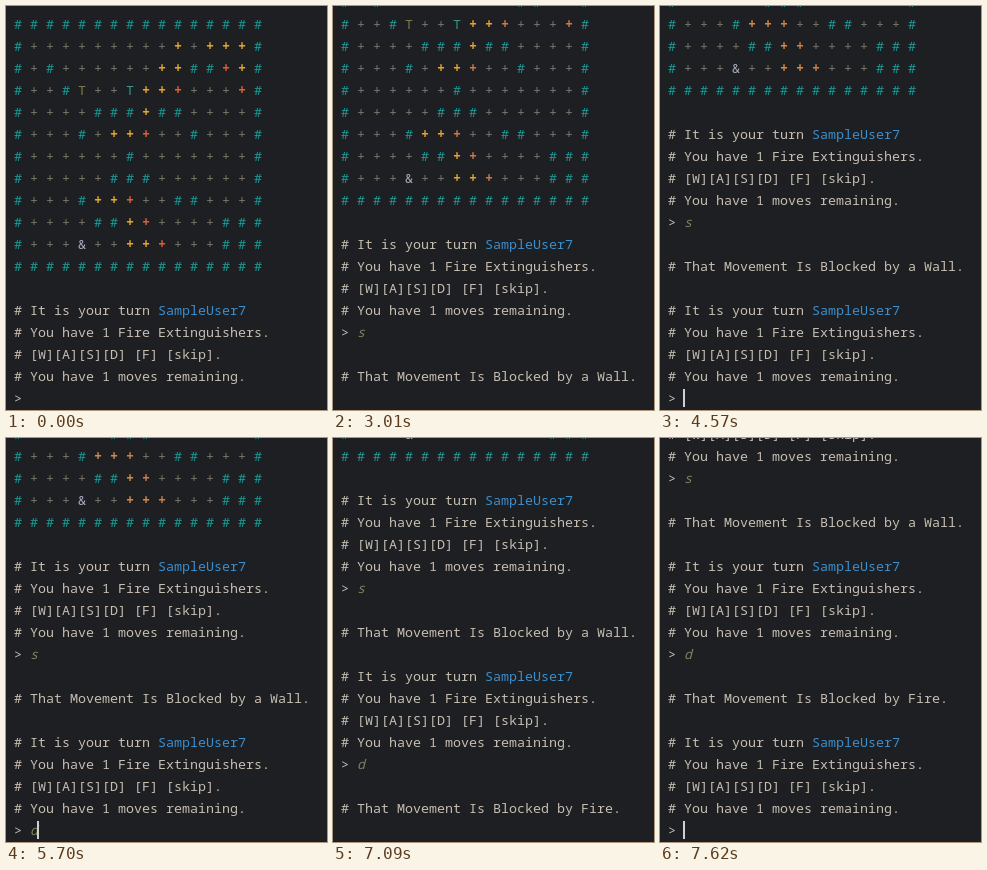
An HTML page with a canvas that plays this animation: 321 by 404 pixels, repeating every 8 s.

```html
<!DOCTYPE html>
<html lang="en">
<head>
<meta charset="utf-8">
<title>Terminal game</title>
<style>
  html, body { margin: 0; width: 100%; height: 100%; overflow: hidden; background: #1e1f22; }
  canvas { display: block; }
</style>
</head>
<body>
<canvas id="screen" width="321" height="404"></canvas>
<script>
const ctx = document.getElementById('screen').getContext('2d');
const LOOP = 8000, CHAR = 8, LINE = 22, LEFT = 8, BASELINE = 23;
const FONT = '13.333px "Noto Sans Mono", "DejaVu Sans Mono", monospace';
const TEXT = '#c6beb2', BLUE = '#3a8fcf', INPUT = '#75835f', CURSOR = '#ced0d6';

// y / r: young and raging fire, 1 / 2: trees, &: player
const MAP = [
  '################',
  '#+++++++++y+yyy#',
  '#+#++++++yy##ry#',
  '#++#1++2yyr+++r#',
  '#++++###y##++++#',
  '#+++#+yyr++#+++#',
  '#++++++#+++++++#',
  '#+++++###++++++#',
  '#+++#yyr++##+++#',
  '#++++##yr++++###',
  '#+++&++yyr+++###',
  '################'
];
const TILES = {
  '#': ['#', '#1c9896'],
  '+': ['+', '#7c766a'],
  '&': ['&', '#a8adbd'],
  '1': ['T', '#7d7a4a'],
  '2': ['T', '#3a9488']
};

const PROMPT = [
  '# It is your turn ',
  '# You have 1 Fire Extinguishers.',
  '# [W][A][S][D] [F] [skip].',
  '# You have 1 moves remaining.',
  '>'
];
// Text blocks: first row, lines, time of appearance
const BLOCKS = [
  [13, PROMPT, 0],
  [19, ['# That Movement Is Blocked by a Wall.'], 2280],
  [21, PROMPT, 3490],
  [27, ['# That Movement Is Blocked by Fire.'], 6360],
  [29, PROMPT, 7560]
];
const KEYS = [[17, 's', 2010], [25, 'd', 5700]];

// Time, top row, colours of young and raging fire
const VIEWS = [
  [0, 0, '#e5a52f', '#d9603c'],
  [2280, 3, '#dfa333', '#c8794a'],
  [3490, 8, '#d2894a', '#cc7f4a'],
  [6360, 11], [7560, 13.5], [7620, 16]
];
// Time, cursor row, column (-1 hides it)
const CURSORS = [
  [0, 17, -1], [390, 17, 2], [940, 17, -1], [1470, 17, 2], [1940, 17, -1],
  [2010, 17, 3], [2280, 20, 0], [3010, 20, -1],
  [3490, 25, 2], [4040, 25, -1], [4570, 25, 2], [5030, 25, -1], [5560, 25, 2],
  [5700, 25, 3], [6360, 28, 0], [7090, 28, -1], [7560, 33, 2]
];

const latest = (steps, t) => steps.filter(step => step[0] <= t).pop();

function write(text, col, row, color, style = '') {
  ctx.font = style + ' ' + FONT;
  ctx.fillStyle = color;
  [...text].forEach((char, i) =>
    ctx.fillText(char, LEFT + (col + i) * CHAR, BASELINE + row * LINE));
}

function drawMap(top, young, raging) {
  MAP.forEach((line, row) => [...line].forEach((tile, col) => {
    const fire = { y: young, r: raging }[tile];
    const [char, color] = fire ? ['+', fire] : TILES[tile];
    write(char, col * 2, row - top, color, fire ? 'bold' : '');
  }));
}

function draw(t) {
  const [, top, young = '#d2894a', raging = '#cc7f4a'] = latest(VIEWS, t);
  ctx.fillStyle = '#1e1f22';
  ctx.fillRect(0, 0, 321, 404);
  drawMap(top, young, raging);

  for (const [first, lines, start] of BLOCKS) {
    if (t < start) continue;
    lines.forEach((line, i) => write(line, 0, first + i - top, TEXT));
    if (lines === PROMPT) write('SampleUser7', PROMPT[0].length, first - top, BLUE);
  }
  for (const [row, key, start] of KEYS) {
    if (t >= start) write(key, 2, row - top, INPUT, 'italic');
  }

  const [, row, col] = latest(CURSORS, t);
  if (col >= 0) {
    ctx.fillStyle = CURSOR;
    ctx.fillRect(Math.max(LEFT, LEFT + col * CHAR - 1), 9 + (row - top) * LINE, 2, 18);
  }
}

function tick() {
  draw(performance.now() % LOOP);
  requestAnimationFrame(tick);
}
tick();
</script>
</body>
</html>
```
